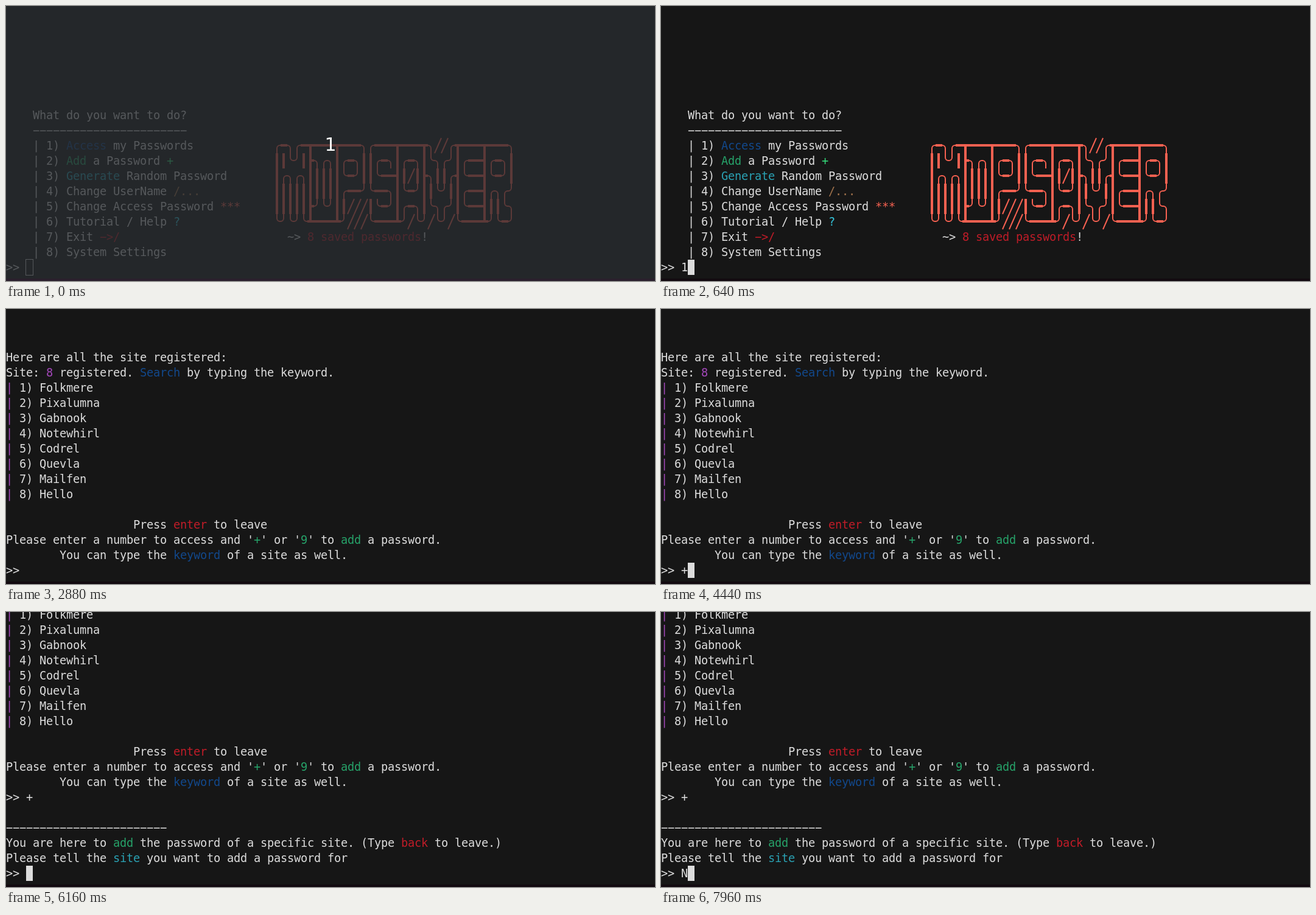
An HTML page with a canvas that plays this animation: 1066 by 452 pixels, repeating every 8 s.

```html
<!DOCTYPE html>
<html lang="en">
<head>
<meta charset="utf-8">
<title>Password terminal</title>
<style>
html, body { margin: 0; width: 100%; height: 100%; overflow: hidden; background: #161616; }
canvas { display: block; }
</style>
</head>
<body>
<canvas id="stage" width="1066" height="452"></canvas>
<script>
const ctx = document.getElementById('stage').getContext('2d');
const LOOP = 8000, CELL_W = 11, CELL_H = 25, TOP = 17, BASELINE = 19, PROMPT_ROW = 16;
const FG = '#dcdcdc', BG = '#161616', BANNER_COLOR = '#f66151';

const COLORS = {
  b: '#12488b', g: '#26a269', G: '#33da7a', c: '#2aa1b3', C: '#33c7de',
  y: '#a2734c', r: '#c01c28', R: '#f66151', m: '#a347ba'
};

// {xText} colours Text with COLORS.x
const MENU = [
  'What do you want to do?',
  '−'.repeat(23),
  '| 1) {bAccess} my Passwords',
  '| 2) {gAdd} a Password {G+}',
  '| 3) {cGenerate} Random Password',
  '| 4) Change UserName {y/...}',
  '| 5) Change Access Password {R***}',
  '| 6) Tutorial / Help {C?}',
  '| 7) Exit {r−>/}',
  '| 8) System Settings'
];

const BANNER = [
  '╭━╮╭━┳━━━┳━━━╮╭━━━┳━━━┳╮╱╱╭┳━━━┳━━━╮',
  '┃┃╰╯┃┣╮╭╮┃╭━╮┃┃╭━╮┃╭━╮┃╰╮╭╯┃╭━━┫╭━╮┃',
  '┃╭╮╭╮┃┃┃┃┃╰━╯┃┃╰━━┫┃╱┃┣╮┃┃╭┫╰━━┫╰━╯┃',
  '┃┃┃┃┃┃┃┃┃┃╭━━╯╰━━╮┃╰━╯┃┃╰╯┃┃╭━━┫╭╮╭╯',
  '┃┃┃┃┃┣╯╰╯┃┃╱╱╱┃╰━╯┃╭━╮┃╰╮╭╯┃╰━━┫┃┃╰╮',
  '╰╯╰╯╰┻━━━┻╯╱╱╱╰━━━┻╯╱╰╯╱╰╯╱╰━━━┻╯╰━╯'
];

const SITES = ['Folkmere', 'Pixalumna', 'Gabnook', 'Notewhirl', 'Codrel', 'Quevla', 'Mailfen', 'Hello'];
const LIST = [
  'Here are all the site registered:',
  'Site: {m8} registered. {bSearch} by typing the keyword.',
  ...SITES.map((site, i) => `{m|} ${i + 1}) ${site}`),
  '',
  ' '.repeat(19) + 'Press {renter} to leave',
  "Please enter a number to access and '{g+}' or '{g9}' to {gadd} a password.",
  ' '.repeat(8) + 'You can type the {bkeyword} of a site as well.'
];
const ADD = [
  ...LIST,
  '>> +',
  '',
  '−'.repeat(24),
  'You are here to {gadd} the password of a specific site. (Type {rback} to leave.)',
  'Please tell the {csite} you want to add a password for'
];

// [start ms, screen, typed text, cursor]
const TIMELINE = [
  [0, drawMenu, '', 'hollow'],
  [80, drawMenu, '', 'solid'],
  [640, drawMenu, '1', 'solid'],
  [1120, drawList, '', 'solid'],
  [1640, drawList, '', ''],
  [2240, drawList, '', 'solid'],
  [2880, drawList, '', ''],
  [2920, drawList, '', 'solid'],
  [3280, drawList, '+', 'solid'],
  [3880, drawList, '+', ''],
  [4440, drawList, '+', 'solid'],
  [5000, drawAdd, '', 'solid'],
  [5560, drawAdd, '', ''],
  [6160, drawAdd, '', 'solid'],
  [6760, drawAdd, '', ''],
  [7400, drawAdd, '', 'solid'],
  [7960, drawAdd, 'N', 'solid']
];

const rowY = row => TOP + row * CELL_H;

function drawText(markup, col, row) {
  for (const part of markup.match(/\{[^}]+\}|[^{]+/g) || []) {
    const tinted = part[0] === '{';
    ctx.fillStyle = tinted ? COLORS[part[1]] : FG;
    for (const ch of tinted ? part.slice(2, -1) : part) {
      ctx.fillText(ch, col++ * CELL_W, rowY(row) + BASELINE);
    }
  }
}

function drawLines(lines, col, row) {
  lines.forEach((line, i) => drawText(line, col, row + i));
}

// Arms reach left, right, up and down from the cell centre.
const HEAVY = { '━': 'lr', '┃': 'ud', '┳': 'lrd', '┻': 'lru', '┣': 'udr', '┫': 'udl' };
const CORNERS = { '╭': [1, 1], '╮': [0, 1], '╰': [1, 0], '╯': [0, 0] };

function drawBox(ch, x, y) {
  const cx = x + 5, cy = y + 12, right = x + CELL_W, bottom = y + CELL_H;
  if (HEAVY[ch]) {
    const has = arm => HEAVY[ch].includes(arm);
    const x0 = has('l') ? x : cx - 2, x1 = has('r') ? right : cx + 2;
    const y0 = has('u') ? y : cy - 2, y1 = has('d') ? bottom : cy + 2;
    ctx.fillRect(x0, cy - 2, x1 - x0, 4);
    ctx.fillRect(cx - 2, y0, 4, y1 - y0);
    return;
  }
  ctx.beginPath();
  if (ch === '╱') {
    ctx.moveTo(x, bottom);
    ctx.lineTo(right, y);
  } else {
    const [toRight, toBottom] = CORNERS[ch];
    const endY = toBottom ? bottom : y;
    ctx.moveTo(toRight ? right : x, cy);
    ctx.arcTo(cx, cy, cx, endY, 5);
    ctx.lineTo(cx, endY);
  }
  ctx.stroke();
}

function drawMenu() {
  drawLines(MENU, 4, 6);
  ctx.fillStyle = ctx.strokeStyle = BANNER_COLOR;
  ctx.lineWidth = 2;
  BANNER.forEach((line, r) => [...line].forEach((ch, c) =>
    drawBox(ch, (40 + c) * CELL_W, rowY(8 + r))));
  drawText('~> {r8 saved passwords}!', 42, 14);
}

function drawList() { drawLines(LIST, 0, 2); }

function drawAdd() { drawLines(ADD, 0, -3); }

function drawPrompt(typed, cursor) {
  drawText('>> ' + typed, 0, PROMPT_ROW);
  const x = (3 + typed.length) * CELL_W, y = rowY(PROMPT_ROW);
  if (cursor === 'solid') {
    ctx.fillStyle = FG;
    ctx.fillRect(x, y, CELL_W, CELL_H);
  } else if (cursor === 'hollow') {
    ctx.strokeStyle = FG;
    ctx.lineWidth = 1;
    ctx.strokeRect(x - 0.5, y - 0.5, CELL_W + 1, CELL_H + 1);
  }
}

function drawKeyOverlay() {
  ctx.fillStyle = 'rgba(40, 44, 48, 0.75)';
  ctx.fillRect(0, 0, 1066, 452);
  ctx.font = '30px "DejaVu Sans", sans-serif';
  ctx.textAlign = 'center';
  ctx.fillStyle = '#fcfcfc';
  ctx.fillText('1', 533, 238);
}

function render(now) {
  const t = now % LOOP;
  const [, drawScreen, typed, cursor] = TIMELINE.filter(step => step[0] <= t).pop();
  const overlay = t < 40;
  ctx.fillStyle = BG;
  ctx.fillRect(0, 0, 1066, 452);
  ctx.font = '18.667px "DejaVu Sans Mono", monospace';
  ctx.textAlign = 'left';
  drawScreen();
  drawPrompt(typed, cursor);
  if (overlay) drawKeyOverlay();
  ctx.fillStyle = overlay ? '#2a202d' : '#120a10';
  ctx.fillRect(0, 448, 1066, 4);
}

const start = performance.now();
function tick() {
  render(performance.now() - start);
  requestAnimationFrame(tick);
}
tick();
</script>
</body>
</html>
```
